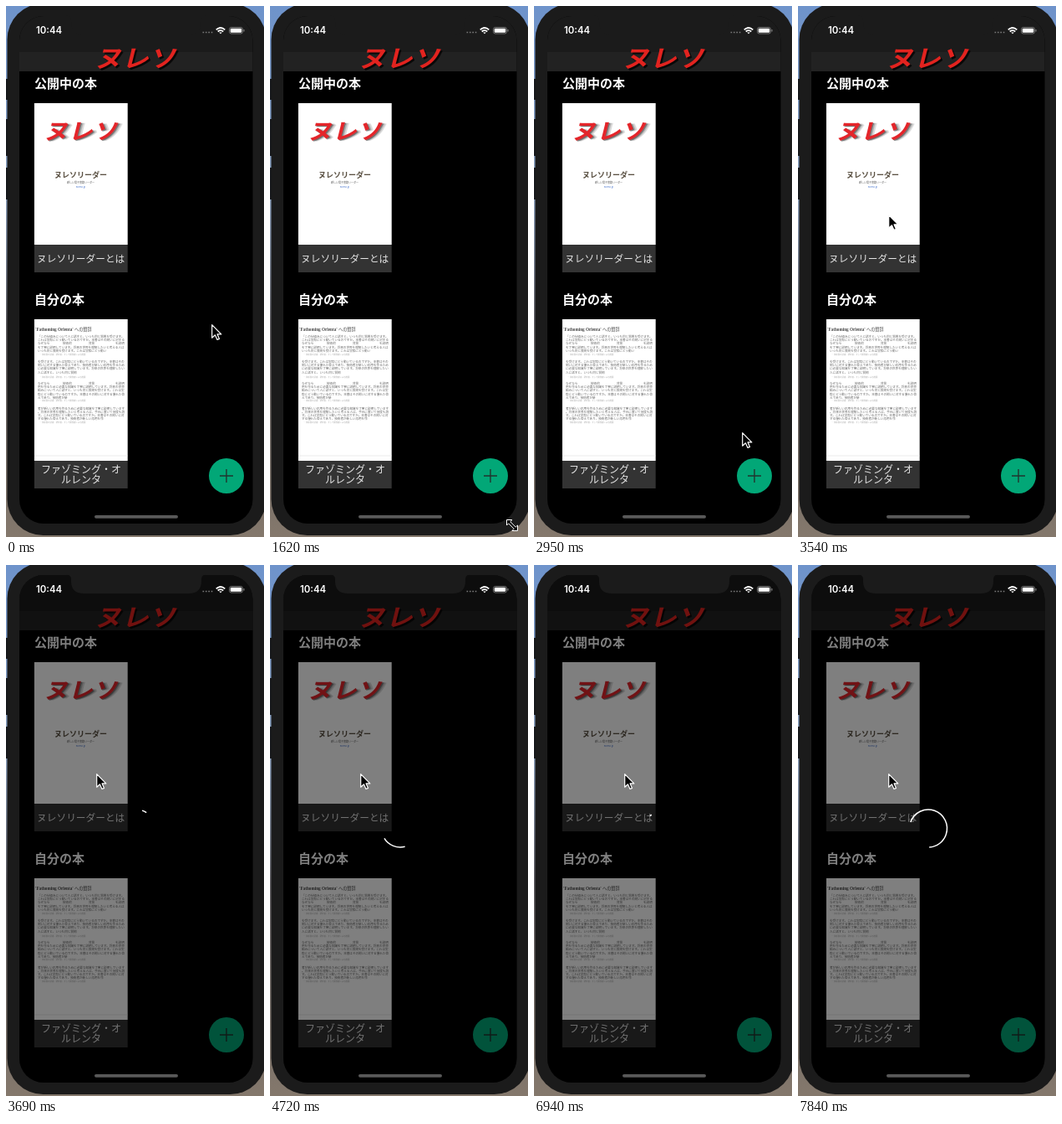
Write an HTML page that moves like this. It is 309 by 634 pixels and loops after 7.99 s.

```html
<!DOCTYPE html>
<html lang="ja">
<head>
<meta charset="utf-8">
<title>本棚</title>
<style>
  html, body { margin: 0; width: 100%; height: 100%; overflow: hidden; background: #1b1b1b; }
  svg { display: block; width: 100vw; height: 100vh; }
  text { font-family: "Noto Sans CJK JP", "Noto Sans CJK", "Noto Sans", sans-serif; }
  .heading { font-size: 15px; font-weight: 700; fill: #fff; }
  .caption { font-size: 12px; font-weight: 350; fill: #e4e4e4; text-anchor: middle; }
  .brand { font-weight: 900; }
  .body { font-size: 3.6px; fill: #666; }
  .credit { font-size: 2.4px; fill: #aaa; }
  .clock { font: 600 11.4px Inter, sans-serif; fill: #fff; }
  .title { font: 700 5.2px "Liberation Serif", "Noto Serif", serif; fill: #4a4a4a; }
  .title tspan { font: 400 5.2px "Noto Sans CJK JP", sans-serif; }
</style>
</head>
<body>
<svg viewBox="0 0 309 634" preserveAspectRatio="none">
  <defs>
    <linearGradient id="wall" x2="0" y2="1">
      <stop offset="0" stop-color="#6e93cb"/>
      <stop offset=".35" stop-color="#8ba0bd"/>
      <stop offset=".6" stop-color="#5c5a5e"/>
      <stop offset="1" stop-color="#84786c"/>
    </linearGradient>
    <linearGradient id="cloud" x2="0" y2="1">
      <stop offset="0" stop-color="#d3e9fb"/>
      <stop offset="1" stop-color="#86bdf0"/>
    </linearGradient>
    <clipPath id="screen"><rect x="16" y="12" width="279.5" height="606" rx="29"/></clipPath>
    <clipPath id="sheet"><rect x="33.9" y="374" width="111.8" height="169"/></clipPath>
  </defs>

  <rect width="309" height="634" fill="url(#wall)"/>
  <path d="M0 87h3v25h-3zM0 135h3v44h-3zM0 193h3v38h-3z" fill="#15171b"/>
  <rect x="1.5" y="-3" width="310" height="635" rx="43" fill="#1b1b1b"/>

  <g clip-path="url(#screen)">
    <rect x="16" y="12" width="280" height="606"/>
    <rect x="16" y="12" width="280" height="43" fill="#1b1b1b"/>
    <rect x="16" y="55" width="280" height="23" fill="#222"/>

    <text class="heading" x="34" y="98">公開中の本</text>
    <rect x="33.9" y="116" width="111.8" height="169" fill="#fff"/>
    <rect x="33.9" y="285" width="111.8" height="33" fill="#333"/>
    <g id="cover"></g>
    <text x="89.5" y="205" text-anchor="middle" font-size="9" font-weight="700" fill="#5a5042">ヌレソリーダー</text>
    <text x="89.5" y="212.3" text-anchor="middle" font-size="3" fill="#555">新しい電子書籍リーダー</text>
    <text x="89.5" y="217" text-anchor="middle" font-size="2.6" fill="#3566c8">nureso.jp</text>
    <text class="caption" x="89.7" y="305.5" style="font-size:11.7px">ヌレソリーダーとは</text>

    <text class="heading" x="34" y="356">自分の本</text>
    <rect x="33.9" y="374" width="111.8" height="169" fill="#fff"/>
    <rect x="33.9" y="543" width="111.8" height="33" fill="#333"/>
    <g clip-path="url(#sheet)">
      <text class="title" x="35" y="388">'Fathoming Orlenta' <tspan>への賛辞</tspan></text>
      <g id="pages"></g>
      <path d="M34 537h112" stroke="#ddd" stroke-width=".6"/>
    </g>
    <text class="caption" x="90" y="558">ファゾミング・オ</text>
    <text class="caption" x="90" y="570">ルレンタ</text>

    <rect id="menuDim" x="16" y="78" width="280" height="540"/>
    <g id="headerBrand"></g>

    <g id="menu">
      <text x="240" y="519" text-anchor="end" font-size="14.2" font-weight="300" fill="#fff">oVeldtからPDFを読み込む</text>
      <circle cx="264" cy="514" r="16" fill="#fff"/>
      <path d="M258 519a4.6 4.6 0 0 1 -.4 -9a6.6 6.6 0 0 1 12.5 -1a5 5 0 0 1 .6 10z" fill="url(#cloud)" stroke="#79b1e6" stroke-width=".7"/>
      <path d="M264 512.5v8.5m-2.6 -2.6l2.6 2.8l2.6 -2.8" fill="none" stroke="#2b63a8" stroke-width="1.3"/>
    </g>
    <circle cx="264" cy="561" r="21" fill="#02a777"/>
    <path id="plus" d="M-8 0h16M0 -8v16" stroke="#21352f" stroke-width="1.4"/>

    <rect id="loadDim" x="16" y="12" width="280" height="606" opacity=".5"/>
    <circle id="spinner" r="22.5" fill="none" stroke="#fff" stroke-width="1.5" pathLength="360"/>
    <rect x="106" y="608" width="100" height="3.7" rx="1.85" fill="#595959"/>
  </g>

  <path d="M72 11q6 1 6 6v2q0 15 15 15h126q15 0 15 -15v-2q0 -5 6 -6z" fill="#1b1b1b"/>
  <text class="clock" x="36" y="33">10:44</text>
  <path d="M235.5 31.5h12" stroke="#777" stroke-width="1.7" stroke-dasharray="1.7 1.7"/>
  <g fill="none" stroke="#fff" stroke-width="1.7">
    <path d="M251.7 28.3q5.3 -4.6 10.6 0M253.7 30.5q3.3 -2.8 6.6 0"/>
    <path d="M255.7 31.7h2.6l-1.3 1.4z" fill="#fff" stroke-width=".5"/>
  </g>
  <rect x="267.5" y="25.5" width="16" height="7.5" rx="2.3" fill="none" stroke="#888" stroke-width=".8"/>
  <rect x="268.7" y="26.7" width="13.6" height="5.1" rx="1.3" fill="#fff"/>
  <path d="M285 28v2.6" stroke="#888"/>

  <path id="arrow" d="M-.3 -.3V15.2L3.4 11.8L6 17.4L8.5 16.4L6.1 10.9H10.8Z" stroke="#fff" stroke-width="1.2" stroke-linejoin="round"/>
  <path id="resize" d="M-6.5 -6.5h6.5l-2.2 2.2l6.5 6.5l2.2 -2.2v6.5h-6.5l2.2 -2.2l-6.5 -6.5l-2.2 2.2z" stroke="#fff"/>
</svg>
<script>
const LOOP = 7990, LOAD_AT = 3690, TICK = 148.2, SPIN = 1.7;
const $ = id => document.getElementById(id);

// time, cursor x, cursor y, menu openness, resize cursor
const steps = [
  [0, 247, 381, 0], [290, 226, 352, 0], [440, 166, 290, 0], [590, 120, 248, 0],
  [740, 114, 242, 0], [890, 150, 300, 0], [1030, 215, 450, 0], [1180, 268, 556, 0],
  [1330, 284, 587, 0], [1470, 290, 626, 0, 1], [1620, 290, 620, 0, 1],
  [1770, 283, 590, 0], [1910, 279, 573, 0], [2060, 279, 572, .45], [2200, 279, 572, .97],
  [2350, 279, 572, 1], [2650, 279, 572, .6], [2800, 276, 562, .15], [2950, 250, 510, 0],
  [3100, 198, 405, 0], [3240, 145, 305, 0], [3390, 113, 256, 0], [3540, 109, 250, 0]
];

const brand = (x, y, size, layers) => layers.map(([dx, dy, fill, opacity]) =>
  `<text class="brand" font-size="${size}" fill="${fill}" opacity="${opacity}"
    transform="translate(${x + dx} ${y + dy}) skewX(-14) scale(1 .9)">ヌレソ</text>`).join('');
$('headerBrand').innerHTML = brand(106, 72.5, 32.5, [[2, 2, '#000', .75], [0, 0, '#e2231f', 1]]);
$('cover').innerHTML = brand(45, 159, 29.5,
  [[5, 1.2, '#777', .25], [3, 1.4, '#666', .35], [1.3, 1.3, '#444', .6], [0, 0, '#e4252a', 1]]);

const prose = '「この仕組みについて人に話すと、いつも同じ質問を受けます。これは実際にどう動いているのですか。' +
  '本書はその問いに対する優れた答えであり、技術者が新しい応用を作るために必要な知識を丁寧に説明しています。' +
  '将来の世界を理解したいと考える人は、手元に置いて何度も読み返すべきでしょう。';
// first baseline, line count, characters on the last line, spaced line, credit baseline
const paragraphs = [
  [396, 5, 23, 2, 416.5], [426, 4, 13, -1, 444], [452, 5, 10, 0, 471.5], [481.5, 4, 22, -1, 498]
];
$('pages').innerHTML = paragraphs.map(([top, count, last, spaced, credit], p) => {
  let out = '';
  for (let i = 0; i < count; i++) {
    const y = top + i * 4.2, from = (p * 23 + i * 29) % 100;
    out += i === spaced
      ? ['なぜなら', '技術的', '背景', 'を説明'].map((word, k) =>
          `<text class="body" x="${[38, 68, 99, 131][k]}" y="${y}">${word}</text>`).join('')
      : `<text class="body" x="38" y="${y}">${prose.substr(from, i === count - 1 ? last : 29)}</text>`;
  }
  return out + `<text class="credit" x="40" y="${credit}">— 技術書の読者、研究者、そして開発者による推薦</text>`;
}).join('');

function ease(x) {
  if (x <= 0 || x >= 1) return x <= 0 ? 0 : 1;
  let lo = 0, hi = 1;
  for (let i = 0; i < 24; i++) {
    const u = (lo + hi) / 2, v = 1 - u;
    if (1.2 * v * v * u + .6 * v * u * u + u * u * u < x) lo = u; else hi = u;
  }
  return lo * lo * (3 - 2 * lo);
}

function drawSpinner(t) {
  const tick = Math.floor((t - LOAD_AT + 8) / TICK);
  const s = (.086 + tick * TICK / 1000) % SPIN;
  const start = 360 * ease((s - .5) / 1.2), end = 360 * ease(s / .7);
  $('spinner').setAttribute('stroke-dasharray', `${end - start} 400`);
  $('spinner').setAttribute('transform', `translate(156 314.5) rotate(${360 * s / SPIN - 90 + start})`);
}

function show(id, visible) {
  $(id).style.display = visible ? '' : 'none';
}

function draw() {
  const t = performance.now() % LOOP;
  const [, x, y, open, resizing] = steps.filter(step => step[0] <= t).pop();
  const loading = t >= LOAD_AT;
  show('arrow', !resizing);
  show('resize', resizing);
  $(resizing ? 'resize' : 'arrow').setAttribute('transform', `translate(${x} ${y})`);
  $('menuDim').setAttribute('opacity', .36 * open);
  $('menu').setAttribute('opacity', open);
  $('plus').setAttribute('transform', `translate(264 561) rotate(${45 * open})`);
  show('loadDim', loading);
  show('spinner', loading);
  if (loading) drawSpinner(t);
  requestAnimationFrame(draw);
}
draw();
</script>
</body>
</html>
```
